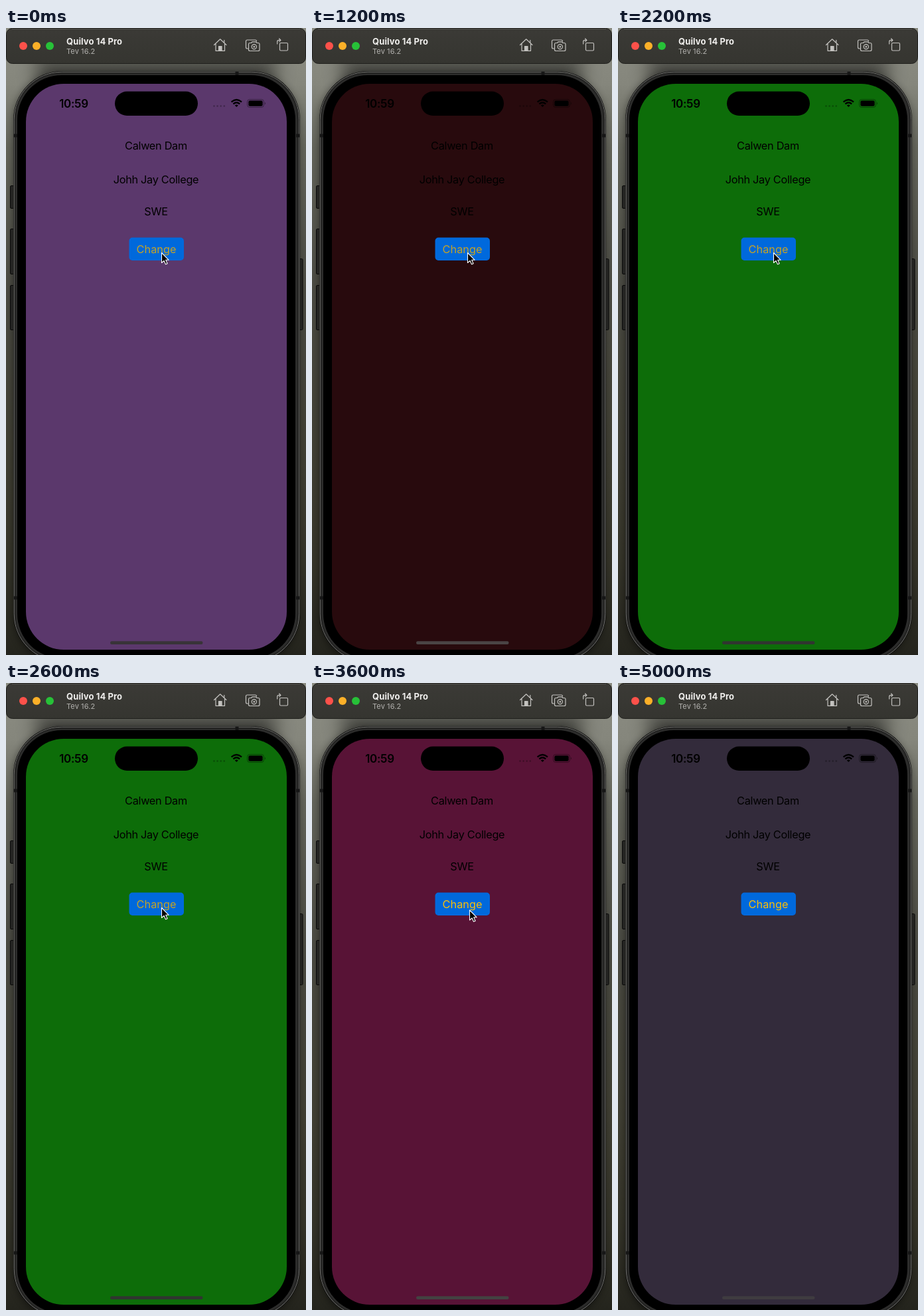
Write an HTML page that moves like this. It is 452 px wide and 944 px high and loops after 5.2 s.

```html
<!DOCTYPE html>
<html lang="en">
<head>
<meta charset="utf-8">
<title>Colour changer</title>
<style>
html, body { margin: 0; width: 100%; height: 100%; overflow: hidden; background: #45453c; }
svg { display: block; width: 452px; height: 944px; font-family: Inter, "Liberation Sans", sans-serif; }
.label { font-size: 16.3px; letter-spacing: -.3px; text-anchor: middle; }
.tool { fill: none; stroke: #c3c2bf; stroke-width: 1.2; stroke-linejoin: round; stroke-linecap: round; }
.key { fill: #252523; stroke: #090909; }
</style>
</head>
<body>
<svg viewBox="0 0 452 944">
  <defs>
    <linearGradient id="wall" x2="0" y2="1">
      <stop offset="0" stop-color="#8c8d83"/>
      <stop offset=".09" stop-color="#85867c"/>
      <stop offset=".19" stop-color="#64655b"/>
      <stop offset=".42" stop-color="#4b4b43"/>
      <stop offset=".7" stop-color="#403f33"/>
      <stop offset=".85" stop-color="#36352a"/>
      <stop offset="1" stop-color="#24241d"/>
    </linearGradient>
    <linearGradient id="bar" x2="0" y2="1">
      <stop offset="0" stop-color="#3b3a36"/>
      <stop offset="1" stop-color="#353530"/>
    </linearGradient>
    <filter id="soft" x="-10%" y="-10%" width="120%" height="120%"><feGaussianBlur stdDeviation="6"/></filter>
    <filter id="wide" x="-20%" y="-100%" width="140%" height="300%"><feGaussianBlur stdDeviation="14"/></filter>
  </defs>

  <rect width="452" height="944" fill="url(#wall)"/>
  <rect x="45" y="46" width="362" height="40" opacity=".5" filter="url(#wide)"/>
  <rect x="11" y="67" width="430" height="890" rx="72" opacity=".45" filter="url(#soft)"/>

  <rect x=".5" y=".5" width="451" height="53" rx="9" fill="url(#bar)" stroke="#1f1f1c"/>
  <path d="M9 1.5H443" stroke="#55544f"/>
  <circle cx="26" cy="27" r="6" fill="#fc514a"/>
  <circle cx="46" cy="27" r="6" fill="#fbb028"/>
  <circle cx="66" cy="27" r="6" fill="#27c138"/>
  <text x="91" y="25" font-size="13" font-weight="700" letter-spacing=".1" fill="#f0efed">Quilvo 14 Pro</text>
  <text x="91" y="39" font-size="11" letter-spacing=".1" fill="#b2b1ae">Tev 16.2</text>

  <g class="tool">
    <path d="M313.5 25.5L322.7 16.8L332 25.5M316 24V34.3H329.5V24M328.8 22V18.3"/>
    <path d="M320.5 34V27.5H325V34Z" fill="#c3c2bf"/>
    <path d="M365 31H363.5Q361.5 31 361.5 29V20Q361.5 18 363.5 18H375.5Q377.5 18 377.5 20"/>
    <path d="M367.5 22.5H369.5L371 20.8H376.5L378 22.5H380Q382 22.5 382 24.5V32.5Q382 34.5 380 34.5H367.5Q365.5 34.5 365.5 32.5V24.5Q365.5 22.5 367.5 22.5Z"/>
    <circle cx="373.8" cy="28.3" r="3.6"/>
    <circle cx="373.8" cy="28.3" r=".8"/>
    <rect x="412.5" y="22.5" width="12" height="11.5" rx="1.5"/>
    <path d="M408.7 24V20.5Q408.7 18.3 411 18.3H413.5M411.7 16L414 18.3L411.7 20.6"/>
  </g>

  <g class="key">
    <rect x="6.5" y="237.5" width="6" height="34" rx="1.5"/>
    <rect x="6.5" y="302.5" width="6" height="68" rx="1.5"/>
    <rect x="6.5" y="387.5" width="6" height="67" rx="1.5"/>
    <rect x="441" y="347.5" width="6" height="107" rx="1.5"/>
  </g>
  <rect x="11" y="65" width="432" height="890" rx="73" fill="#0b0b0b"/>
  <rect x="12.2" y="66.2" width="429.6" height="887.6" rx="72" fill="#2d2d2c" stroke="#777773"/>
  <rect x="14" y="68" width="426" height="884" rx="70" fill="none" stroke="#232322" stroke-width="2"/>
  <path d="M12 162H17M437 162H442M12 858H17M437 858H442M348 66V71" stroke="#161616" stroke-width="5"/>
  <rect x="17" y="71" width="419" height="878" rx="67"/>

  <rect id="screen" x="30" y="84" width="393" height="852" rx="57"/>
  <rect x="164" y="95.5" width="125" height="36.5" rx="18.2"/>
  <text x="102" y="119.5" font-size="17" font-weight="600" letter-spacing="-.3" text-anchor="middle">10:59</text>
  <g opacity=".3">
    <circle cx="313.5" cy="117.5" r="1.3"/><circle cx="318.6" cy="117.5" r="1.3"/>
    <circle cx="323.7" cy="117.5" r="1.3"/><circle cx="328.8" cy="117.5" r="1.3"/>
  </g>
  <g fill="none" stroke="#000" stroke-width="2.3">
    <path d="M339.6 111.4Q347.3 104.6 355 111.4M342.4 114.4Q347.3 110.2 352.2 114.4"/>
    <path d="M344.8 116.4Q347.3 114.6 349.8 116.4L347.3 119Z" fill="#000" stroke="none"/>
  </g>
  <rect x="363.5" y="107.5" width="25" height="12" rx="3.8" fill="none" stroke="#000" opacity=".4"/>
  <rect x="365.3" y="109.2" width="21.4" height="8.6" rx="2.3"/>
  <path d="M390 111.5Q392 113.5 390 115.5Z" opacity=".45"/>

  <g class="label">
    <text x="226" y="183">Calwen Dam</text>
    <text x="226" y="234">Johh Jay College</text>
    <text x="226" y="282">SWE</text>
    <rect x="185.5" y="315.5" width="82.5" height="34.5" rx="5" fill="#0069dc"/>
    <text id="change" x="226.5" y="339" letter-spacing="0">Change</text>
  </g>
  <rect id="home" x="157" y="923.3" width="139.5" height="4.7" rx="2.3"/>
  <path id="cursor" d="M0 0V15L3.5 11.8L6 17.3L8.6 16.2L6.2 10.8H10.7Z" stroke="#fff" stroke-width="1.1" stroke-linejoin="round"/>
</svg>
<script>
const LOOP = 5200;
// start time, screen, home bar, button pressed, cursor position
const steps = [
  [0, '#5b386c', '#383338', true, [234.5, 338.5]],
  [400, '#4d4d03', '#363630', true, [234.5, 338.5]],
  [1000, '#280a0d', '#4a4445', true, [234.5, 338.5]],
  [1800, '#0d6d09', '#303530', true, [234.5, 338.5]],
  [2800, '#1a2f37', '#434342', false, [235.5, 342]],
  [3400, '#581336', '#434242', false, [237.5, 342]],
  [4400, '#332b3b', '#3f3c40', false, null]
];
const [screenEl, changeEl, homeEl, cursorEl] =
  ['screen', 'change', 'home', 'cursor'].map(id => document.getElementById(id));

function draw(time) {
  const [, color, bar, pressed, point] = steps.findLast(step => step[0] <= time);
  screenEl.setAttribute('fill', color);
  homeEl.setAttribute('fill', bar);
  changeEl.setAttribute('fill', pressed ? '#c4a326' : '#fbbf08');
  cursorEl.setAttribute('visibility', point ? 'visible' : 'hidden');
  if (point) cursorEl.setAttribute('transform', `translate(${point})`);
}

const start = performance.now();
function tick() {
  draw((performance.now() - start) % LOOP);
  requestAnimationFrame(tick);
}
tick();
</script>
</body>
</html>
```
